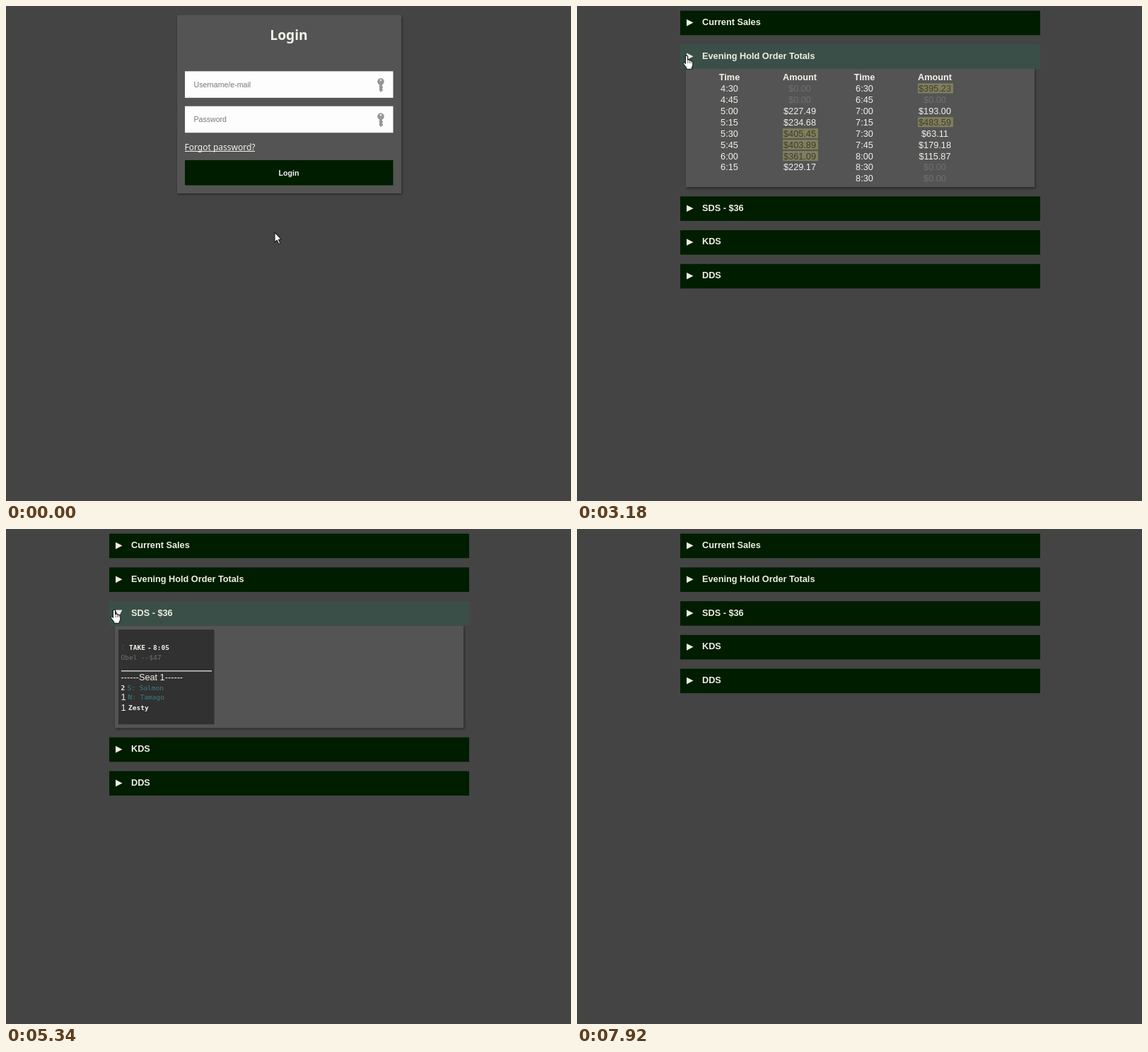
Animation of 799x700 px, one loop 8580 ms. Source, as an HTML page with a canvas:

```html
<!DOCTYPE html>
<html lang="en">
<head>
<meta charset="utf-8">
<title>Order dashboard</title>
<style>
html, body { margin: 0; width: 100%; height: 100%; overflow: hidden; background: #444; }
canvas { display: block; }
</style>
</head>
<body>
<canvas id="stage" width="799" height="700"></canvas>
<script>
const ctx = document.getElementById("stage").getContext("2d");
const LOOP = 8580, PAGE_AT = 1200;
const ARIAL = '"Liberation Sans", Arial, sans-serif';
const SANS = '"Noto Sans", "Open Sans", sans-serif';
const MONO = '"DejaVu Sans Mono", monospace';
const BODY = "12.72px " + ARIAL, BOLD = "bold " + BODY, SMALL = "10.6px " + ARIAL;
const INK = "#f2f2ec", GREEN = "#001d00", HOVER = "#3a4f48", PANEL = "#545454";
const DIM = "#707070", TEAL = "#3f7d80";

// Accordion rows: title, panel height, open and close times
const rows = [
  { title: "Current Sales", h: 466, open: 1860, close: 2400 },
  { title: "Evening Hold Order Totals", h: 167.2, open: 3180, close: 4680, body: totals },
  { title: "SDS - $36", h: 144.8, open: 5160, close: 6480, body: ticket },
  { title: "KDS", h: 128, open: 6690, close: 7020 },
  { title: "DDS", h: 74, open: 7200, close: 7560 }
];

// Pointer path: time, x, y
const path = [
  [60, 380, 320], [510, 325, 108], [1440, 325, 108], [1830, 155, 26],
  [2490, 155, 26], [2640, 155, 62], [2970, 155, 62], [3150, 155, 70],
  [3510, 155, 70], [3870, 235, 150], [4350, 163, 66], [4950, 163, 66],
  [5130, 153, 114], [6510, 153, 114], [6660, 161, 163], [7050, 161, 163],
  [7190, 158, 211], [7620, 158, 211], [7920, 250, 285]
];

const clamp = v => Math.max(0, Math.min(1, v));
const ease = v => v * v * (3 - 2 * v);

function pointer(t) {
  let a = path[0];
  for (const b of path) {
    if (t < b[0]) {
      if (a === b) break;
      const k = ease((t - a[0]) / (b[0] - a[0]));
      return { x: a[1] + (b[1] - a[1]) * k, y: a[2] + (b[2] - a[2]) * k };
    }
    a = b;
  }
  return { x: a[1], y: a[2] };
}

function rect(x, y, w, h, fill) {
  ctx.fillStyle = fill;
  ctx.fillRect(x, y, w, h);
}

function text(str, x, y, font, fill = INK, align = "left") {
  ctx.font = font;
  ctx.fillStyle = fill;
  ctx.textAlign = align;
  ctx.fillText(str, x, y);
}

function panel(x, y, w, h) {
  ctx.save();
  ctx.shadowColor = "rgba(0,0,0,.45)";
  ctx.shadowBlur = 3;
  ctx.shadowOffsetX = 1;
  ctx.shadowOffsetY = 1.5;
  rect(x, y, w, h, PANEL);
  ctx.restore();
}

function shape(points, fill) {
  ctx.beginPath();
  points.forEach(p => ctx.lineTo(p[0], p[1]));
  ctx.closePath();
  ctx.fillStyle = fill;
  ctx.fill();
}

const inside = (p, x, y, w, h) => p.x >= x && p.x < x + w && p.y >= y && p.y < y + h;

function key(x, y) {
  ctx.beginPath();
  ctx.arc(x, y, 4.8, 0, 7);
  ctx.fillStyle = "#969696";
  ctx.fill();
  rect(x - 2, y + 4, 4, 9, "#969696");
  shape([[x - 2, y + 13], [x + 2, y + 13], [x, y + 15]], "#969696");
  rect(x + 1, y + 7, 2, 2, "#969696");
  rect(x + 1, y + 11, 2, 2, "#969696");
  ctx.beginPath();
  ctx.arc(x, y - 2, 1.3, 0, 7);
  ctx.fillStyle = "#eee";
  ctx.fill();
}

function field(y, hint, value, caret) {
  rect(253, y, 294.5, 37.5, "#fdfdfd");
  text(value || hint, 265.5, y + 22.3, SMALL, value ? "#111" : "#777");
  if (caret) {
    const w = value ? ctx.measureText(value).width : 0;
    rect(266 + Math.round(w), y + 12.5, 1, 13, "#111");
  }
  key(530, y + 14.5);
}

function login(t, p) {
  panel(242, 13, 317, 252);
  text("Login", 400, 47.5, "bold 19.2px " + SANS, INK, "center");
  field(92.3, "Username/e-mail", t >= 660 ? "a" : "", t >= 480 && t < 810);
  field(141.7, "Password", t >= 960 ? "•" : "", t >= 810);
  text("Forgot password?", 252.5, 203.5, "12px " + SANS);
  rect(253, 205, 99, 1, INK);
  const hot = inside(p, 253, 218, 294.5, 35.5);
  rect(253, 218, 294.5, 35.5, hot ? HOVER : GREEN);
  text("Login", 400, 239.7, "bold " + SMALL, INK, "center");
  if (hot) return "hand";
  const typing = t >= 660;
  return inside(p, 253, 92, 294.5, 88) ? (typing ? "none" : "beam") : "arrow";
}

// "*" marks a highlighted amount
const early = "0.00 0.00 227.49 234.68 *405.45 *403.89 *361.09 229.17".split(" ");
const late = "*395.23 0.00 193.00 *483.59 63.11 179.18 115.87 0.00 0.00".split(" ");

function column(x, y, start, amounts) {
  text("Time", x, y, BOLD, INK, "center");
  text("Amount", x + 99.5, y, BOLD, INK, "center");
  amounts.forEach((raw, i) => {
    const mark = raw[0] === "*", sum = raw.replace("*", "");
    const base = y + 15.94 * (i + 1);
    let min = start + 15 * i;
    if (min === 510 - 15) min = 510;
    const clock = Math.floor(min / 60) + ":" + String(min % 60).padStart(2, "0");
    text(clock, x, base, BODY, INK, "center");
    if (mark) rect(x + 75.5, base - 11.5, 50, 14, "#807e5d");
    const tone = mark ? "#3d3c2c" : sum === "0.00" ? DIM : INK;
    text("$" + sum, x + 99.5, base, BODY, tone, "center");
  });
}

function totals(y) {
  column(215.5, y + 16, 270, early);
  column(406.5, y + 16, 390, late);
}

function ticket(y) {
  const mono = "9.5px " + MONO, strong = "bold " + mono;
  rect(159, y + 5.5, 135.5, 134, "#313131");
  text("C", 163, y + 34, mono, "#464646");
  text("TAKE", 174, y + 34, strong);
  text("-", 200, y + 34, strong);
  text("8:05", 208, y + 34, strong);
  text("Obel --$47", 162.5, y + 48, mono, DIM);
  rect(163, y + 63.5, 128, 1.2, INK);
  text("------Seat 1------", 162.5, y + 77, BODY);
  text("2", 162.5, y + 91, strong);
  text("S: Salmon", 171.5, y + 91, mono, TEAL);
  text("1", 162.5, y + 105.5, BODY);
  text("N: Tamago", 172.5, y + 104.5, mono, TEAL);
  text("1", 162.5, y + 120, BODY);
  text("Zesty", 173, y + 119.5, strong);
}

function dashboard(t, p) {
  let y = 6.6, kind = "arrow";
  for (const r of rows) {
    const hot = inside(p, 146, y, 509, 34.6);
    if (hot) kind = "hand";
    const isOpen = t >= r.open && t < r.close;
    if (isOpen) {
      panel(154, y + 34.6, 493, r.h);
      if (r.body) r.body(y + 34.6);
    }
    rect(146, y, 509, 34.6, hot ? HOVER : GREEN);
    text(r.title, 177, y + 20.4, BOLD, "#eeeee2");
    const turn = clamp((t - r.open) / 100) - clamp((t - r.close) / 100);
    ctx.save();
    ctx.translate(159.5, y + 17);
    ctx.rotate(turn * Math.PI / 2);
    shape([[-4.5, -4.8], [5, 0], [-4.5, 4.8]], "#eeeee2");
    ctx.restore();
    y += 47.75 + (isOpen ? r.h : 0);
  }
  return kind;
}

const arrowPath = new Path2D("M0 0V14L3.2 11.2L5.6 16.5L7.8 15.5L5.5 10.4H9.6Z");
const handPath = new Path2D("M-1.6 1.2Q0 -1 1.6 1.2V6.5L3 6Q4.3 6 4.7 7.2Q6.4 6.4 7 8Q8.6 7.8 8.8 9.5V14Q8.4 16 7.3 17V19.4H-.3V17.5Q-2.5 15 -4.8 11.3Q-5 9.4 -3.2 9.8L-1.6 11.4Z");

function drawPointer(kind, p) {
  if (kind === "none") return;
  ctx.save();
  ctx.translate(p.x, p.y);
  ctx.lineJoin = "round";
  if (kind === "beam") {
    rect(-.5, -7, 1, 14, "#222");
    rect(-2.5, -7.5, 5, 1, "#222");
    rect(-2.5, 6.5, 5, 1, "#222");
  } else {
    const outline = kind === "hand" ? handPath : arrowPath;
    ctx.lineWidth = 1.2;
    ctx.strokeStyle = "#222";
    ctx.fillStyle = "#fff";
    ctx.fill(outline);
    ctx.stroke(outline);
    if (kind === "hand") {
      ctx.lineWidth = .7;
      ctx.beginPath();
      for (const x of [1.8, 4.4, 6.8]) {
        ctx.moveTo(x, 7.5);
        ctx.lineTo(x, 11);
      }
      ctx.stroke();
    }
  }
  ctx.restore();
}

function draw(t) {
  const p = pointer(t);
  rect(0, 0, 799, 700, "#444");
  const shown = t < 7890;
  const probe = shown ? p : { x: -99, y: -99 };
  const kind = t < PAGE_AT ? login(t, probe) : dashboard(t, probe);
  if (shown) drawPointer(kind, p);
}

let begin;
function frame(now) {
  if (begin === undefined) begin = now;
  draw((now - begin) % LOOP);
  requestAnimationFrame(frame);
}
requestAnimationFrame(frame);
</script>
</body>
</html>
```
